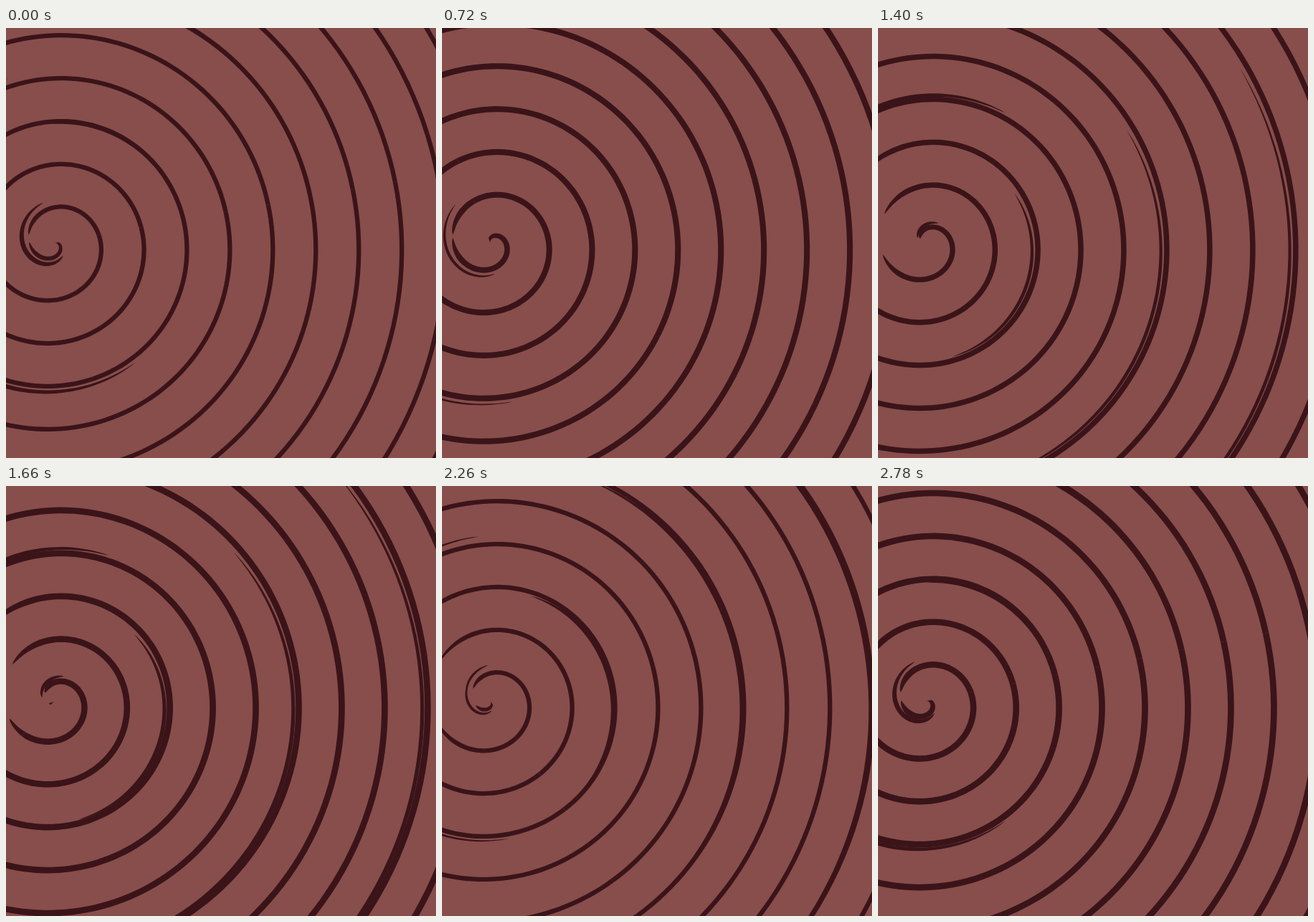
These frames come from a looping animation (600x600 px, 2800 ms). An HTML page with a canvas:

```html
<!DOCTYPE html>
<html lang="en">
<head>
<meta charset="utf-8">
<title>Spiral</title>
<style>
  html, body { margin: 0; width: 100%; height: 100%; overflow: hidden; background: #874e4b; }
  canvas { display: block; width: 600px; height: 600px; }
</style>
</head>
<body>
<canvas id="stage" width="600" height="600"></canvas>
<script>
const ctx = document.getElementById('stage').getContext('2d');
const LIGHT = '#874e4b', DARK = '#3a1419';
const CX = 67.5, CY = 300, PITCH = 60, REACH = 640;
const LOOP = 2800, TRIPLE = 140, STEPS = 60;

const lerp = (a, b, f) => a + (b - a) * f;
const clamp = v => Math.max(0, Math.min(1, v));
const wave = (step, period) => Math.cos(2 * Math.PI * step / period);
const hump = (f, power) => Math.pow(Math.max(0, Math.sin(Math.PI * clamp(f))), power);
const turnAt = (r, base) => (r - base) * 360 / PITCH;

// Fills a band between two angles; radius and width are functions of the angle
function band(from, to, radius, width) {
  const n = Math.max(2, Math.ceil((to - from) / 2));
  const edge = (i, side) => {
    const deg = lerp(from, to, i / n), a = deg * Math.PI / 180;
    const r = Math.max(0, radius(deg) + side * width(deg) / 2);
    ctx.lineTo(CX + r * Math.cos(a), CY + r * Math.sin(a));
  };
  ctx.beginPath();
  for (let i = 0; i <= n; i++) edge(i, 1);
  for (let i = n; i >= 0; i--) edge(i, -1);
  ctx.fill();
}

// The long arm, thinned towards the left side
function drawArm(step) {
  const beat = wave(step, 24);
  const base = 65.3 - 0.6 * beat + step;
  const thick = 7.5 - 1.2 * beat;
  const gap = 17 - 17 * wave(step - 10, STEPS);
  const radius = deg => base + deg * PITCH / 360;
  const width = deg => {
    const turn = ((deg - 190) % 360 + 360) % 360;
    const away = Math.min(turn, 360 - turn);
    return thick * Math.sqrt(clamp((away - gap) / 32));
  };
  for (let a = turnAt(3, base); a < turnAt(REACH, base); a += 360) band(a, a + 360, radius, width);
}

// A sliver beside every third ring, tapered at both ends
function drawSliver(age, from, span, d0, d1, thick) {
  const home = 65.3 + age + PITCH;
  const part = deg => (deg - from) / span;
  const width = deg => thick * hump(part(deg), 0.6);
  for (let base = home - 6 * PITCH; base < REACH; base += 3 * PITCH) {
    const radius = deg => base + deg * PITCH / 360 + lerp(d0, d1, part(deg));
    const start = Math.max(from, turnAt(8, base));
    if (start < from + span) band(start, from + span, radius, width);
  }
}

// Closes in on the arm from the inside while turning back
function innerSliver(age) {
  const f = (age - 16) / 54;
  if (f < 0 || f > 1) return;
  const d = lerp(-12, -2, f);
  drawSliver(age, -113 * f, 125 * hump(f, 0.5), d, d + 4, 6 * hump(f, 0.7));
}

// Swells and fades outside the arm on the left
function sideSliver(age) {
  const f = (age - 45) / 35;
  if (f < 0 || f > 1) return;
  const span = 200 * hump(f, 0.3);
  drawSliver(age, 155 - span / 2, span, 5 + 4 * f, 8 + 6 * f, 7 * hump(f, 0.5));
}

// Leaves the arm outwards, its tip turning back
function outerSliver(age) {
  const f = (age - 74) / 42;
  if (f < 0 || f > 1) return;
  const tip = -105 * Math.pow(f, 0.6), span = 95 * hump(f, 0.5);
  drawSliver(age, tip - span, span, 10 * f, 3 + 10 * f, 5.5 * hump(f, 0.7));
}

// Steps in groups of three, the middle one held longer
function stepAt(t) {
  const rest = t % TRIPLE;
  return 3 * Math.floor(t / TRIPLE) + (rest < 20 ? 0 : rest < 120 ? 1 : 2);
}

function draw(now) {
  const step = stepAt(now % LOOP);
  ctx.fillStyle = LIGHT;
  ctx.fillRect(0, 0, 600, 600);
  ctx.fillStyle = DARK;
  drawArm(step);
  for (const age of [step, step + STEPS]) {
    innerSliver(age);
    sideSliver(age);
    outerSliver(age);
  }
}

let begin = null;
function tick(now) {
  if (begin === null) begin = now;
  draw(now - begin);
  requestAnimationFrame(tick);
}
draw(0);
requestAnimationFrame(tick);
</script>
</body>
</html>
```
